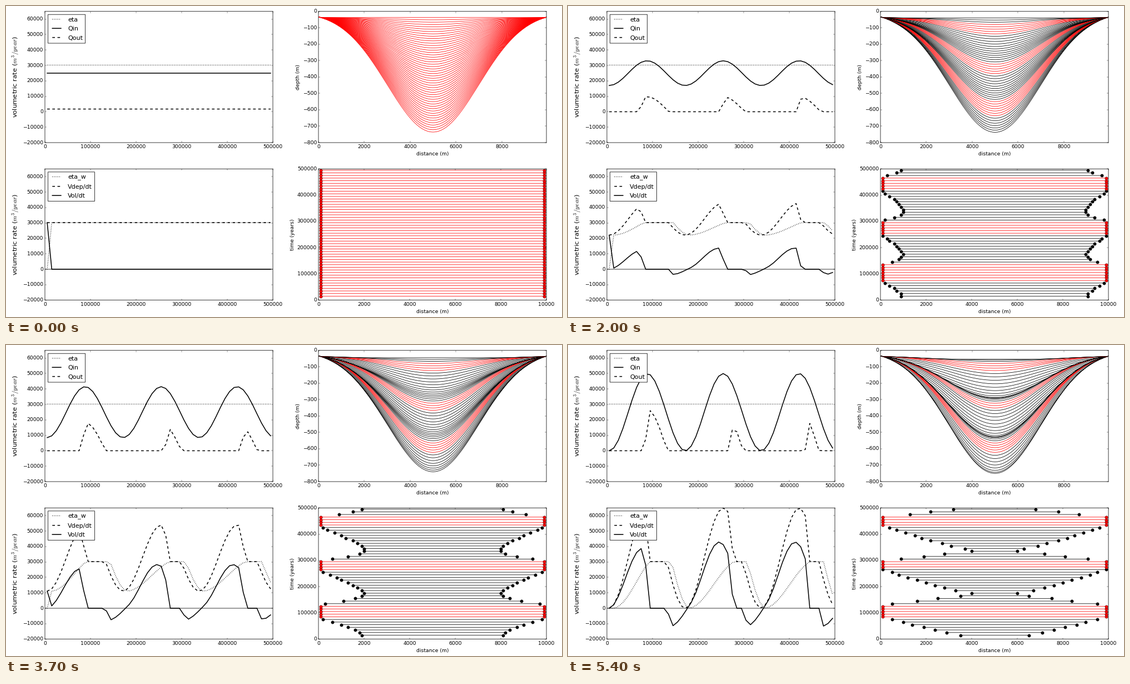
A matplotlib script for the animation above (5900 ms loop, 1000x560 px).

```python
import numpy as np
import matplotlib.pyplot as plt
from matplotlib.animation import FuncAnimation

plt.style.use("classic")
plt.rcParams.update({
    "font.family": "DejaVu Sans",
    "figure.facecolor": "white",
    "savefig.facecolor": "white",
    "savefig.dpi": "figure",
    "path.snap": False,
    "legend.labelspacing": 0.58,
})

W, H, DPI = 1000, 560, 55.55

# Basin model: Gaussian subsidence, horizontal fill, overflow at the rim
STEPS, DT = 50, 10000
SINK = 15.0                 # metres of subsidence per step at the centre
SIGMA = 2000.0
DR, RIM = 100, 49           # cell size and index of the rim cell
BULKING = 1 / 0.77          # deposit volume per unit of supplied sediment
MEAN_Q = 25000
AMP_STEP, LAST = 500, 50

r = np.arange(0, 5001, DR, dtype=float)
area = 2 * np.pi * r * DR
area[0] = np.pi * (DR / 2) ** 2
drop = SINK * np.exp(-r**2 / (2 * SIGMA**2))
step = np.arange(STEPS)
time = 5000 + DT * step


def room(radius):
    """Rate of new space below the level of the given radius."""
    edge = SINK * np.exp(-radius**2 / (2 * SIGMA**2))
    return np.sum(area * np.clip(drop - edge, 0, None)) / DT


ETA = room(r[RIM])


def fill(z, volume):
    """Flood z with a volume; return surface, shore cell, radius, fullness."""
    floor, ring = z[:RIM], area[:RIM]
    level = (volume + np.cumsum(ring * floor)) / np.cumsum(ring)
    fits = np.flatnonzero(level <= z[1:RIM + 1])
    full = len(fits) == 0
    n = RIM if full else fits[0] + 1
    top = z[RIM] if full else level[n - 1]
    radius = r[RIM] if full else np.interp(top, z[n - 1:n + 1], r[n - 1:n + 1])
    new = z.copy()
    new[:n] = top
    return new, n, radius, full


def simulate(amp):
    qin = MEAN_Q - amp * np.cos(2 * np.pi * 3 * step / STEPS)
    z = np.zeros_like(r)
    radius = 0.0
    eta_w, dep = np.zeros(STEPS), np.zeros(STEPS)
    surfaces, shore, full = [], [], []
    for i in step:
        eta_w[i] = room(radius)
        z = z - drop
        new, n, radius, over = fill(z, BULKING * qin[i] * DT)
        dep[i] = np.sum(area * (new - z)) / DT
        z = new
        surfaces.append(z - drop * (STEPS - 1 - i))
        shore.append(r[n])
        full.append(over)
    qout = np.where(full, qin - dep / BULKING, 0)
    return dict(qin=qin, qout=qout, eta_w=eta_w, dep=dep, vol=dep - eta_w,
                surfaces=surfaces, shore=shore, full=full)


runs = [simulate(AMP_STEP * k) for k in range(LAST + 1)]

# The tiny margin keeps the pixel size from being rounded down
fig = plt.figure(figsize=((W + 1e-6) / DPI, (H + 1e-6) / DPI), dpi=DPI)


def panel(x, y, xlim, ylim, xticks, yticks):
    w, h = 410, 236.3
    ax = fig.add_axes([x / W, 1 - (y + h) / H, w / W, h / H])
    ax.set(xlim=xlim, ylim=ylim, xticks=xticks, yticks=yticks)
    ax.set_autoscale_on(False)
    return ax


def rate_panel(y):
    ax = panel(70, y, (0, 500000), (-20000, 65000),
               range(0, 500001, 100000), range(-20000, 60001, 10000))
    ax.set_ylabel(r"volumetric rate ($m^3/year$)", fontsize=15)
    return ax


def rate_line(ax, style, label):
    return ax.plot(time, 0 * time, "k" + style, lw=2, label=label)[0]


flux = rate_panel(9.7)
eta = rate_line(flux, ":", "eta")
eta.set_ydata(np.full(STEPS, ETA))
rate_lines = {"qin": rate_line(flux, "-", "Qin"),
              "qout": rate_line(flux, "--", "Qout")}
flux.legend(loc="upper left")

budget = rate_panel(293.3)
rate_lines["eta_w"] = rate_line(budget, ":", "eta_w")
rate_lines["dep"] = rate_line(budget, "--", "Vdep/dt")
rate_lines["vol"] = rate_line(budget, "-", "Vol/dt")
budget.axhline(0, color="k", lw=1)
budget.legend(loc="upper left")

section = panel(562, 9.7, (0, 9950), (-800, 0),
                range(0, 8001, 2000), range(-800, 1, 100))
section.set(xlabel="distance (m)", ylabel="depth (m)")
xs = np.arange(0, 9951, 50)
layers = [section.plot(xs, 0 * xs, lw=1)[0] for _ in step]

chart = panel(562, 293.3, (0, 10000), (0, 500000),
              range(0, 10001, 2000), range(0, 500001, 100000))
chart.set(xlabel="distance (m)", ylabel="time (years)")
spans = [chart.plot([0, 0], [t, t], "o-", lw=1, ms=7)[0] for t in time[1:]]


def draw(n):
    run = runs[min(max(n - 4, 0), LAST)]
    for key, line in rate_lines.items():
        line.set_ydata(run[key])
    colors = ["r" if f else "k" for f in run["full"]]
    for line, z, color in zip(layers, run["surfaces"], colors):
        line.set_ydata(np.interp(abs(xs - 5000), r, z))
        line.set_color(color)
    for line, half, color in zip(spans, run["shore"][1:], colors[1:]):
        line.set_xdata([5000 - half, 5000 + half])
        line.set_color(color)
        line.set_markerfacecolor(color)
        line.set_markeredgecolor("k")
    return []


anim = FuncAnimation(fig, draw, frames=59, interval=100, repeat=True,
                     repeat_delay=0, init_func=lambda: draw(0))
plt.show()
```
